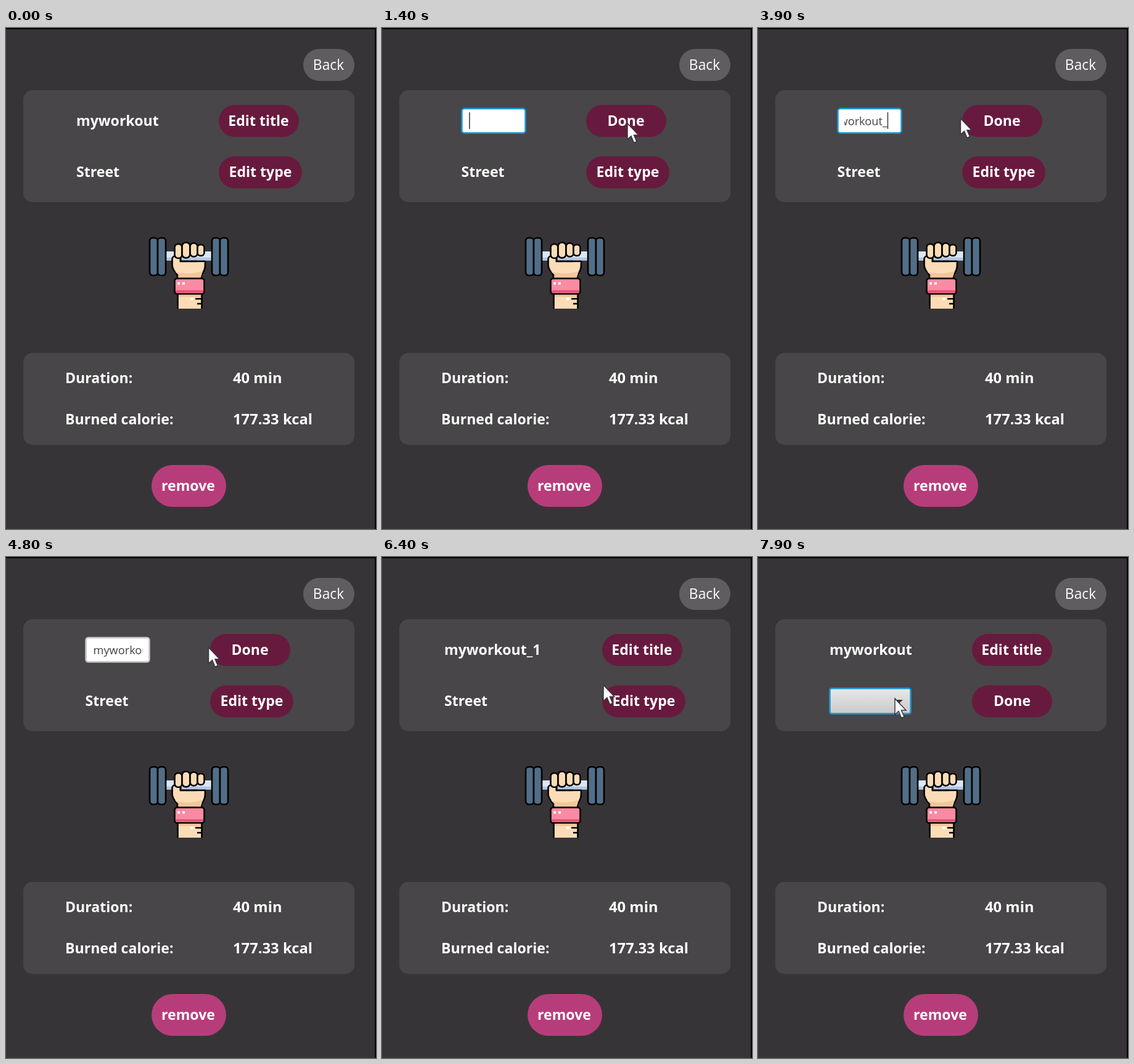
An HTML page that plays this animation: 600 by 814 pixels, repeating every 8000 ms.

```html
<!DOCTYPE html>
<html lang="en">
<head>
<meta charset="utf-8">
<title>Workout editor</title>
<style>
  html, body { margin: 0; width: 100%; height: 100%; overflow: hidden; background: #373437; }
  svg { display: block; width: 100vw; height: 100vh; }
  text { font: 700 23.1px "Open Sans", "Noto Sans", sans-serif; fill: #fff; white-space: pre; }
  .mid { text-anchor: middle; }
  .panel { fill: #484648; }
  .button { fill: #671a3e; }
  .plate { fill: #536e87; stroke: #000; stroke-width: 2.6; }
  .skin { fill: #fbdcb7; stroke: #000; stroke-width: 2.6; stroke-linejoin: round; }
  .line { fill: none; stroke: #000; stroke-width: 2.6; }
</style>
</head>
<body>
<svg viewBox="0 0 600 814">
  <defs>
    <linearGradient id="comboFill" x2="0" y2="1">
      <stop offset="0" stop-color="#e9e8e9"/><stop offset="1" stop-color="#cbcacb"/>
    </linearGradient>
    <clipPath id="fieldClip"><path d="M140 132H222V169H140Z"/></clipPath>
    <g id="plates">
      <rect class="plate" x="1.5" y="341" width="13" height="61" rx="5"/>
      <rect class="plate" x="14.5" y="341" width="13" height="61" rx="5"/>
    </g>
  </defs>

  <rect width="600" height="814" fill="#373437"/>
  <path d="M0 0H600V814H598V2H0Z"/>
  <rect x="482" y="34" width="83" height="52" rx="26" fill="#5f5d5f"/>
  <text class="mid" x="523" y="68" style="font-weight:400;font-size:22.8px">Back</text>
  <rect class="panel" x="28" y="101" width="537" height="182" rx="15"/>
  <rect class="panel" x="28" y="528" width="537" height="149.500" rx="15"/>
  <text x="96" y="577">Duration:</text>
  <text x="368" y="577" style="font-size:23.8px">40 min</text>
  <text x="96" y="644">Burned calorie:</text>
  <text x="368" y="644" style="font-size:23.8px">177.33 kcal</text>
  <rect x="236" y="710" width="121" height="68" rx="34" fill="#b73d7a"/>
  <text class="mid" x="295.500" y="752">remove</text>

  <!-- dumbbell -->
  <rect x="259" y="363" width="76" height="15" fill="#dce6f5"/>
  <path d="M259 373H335V378H259Z" fill="#b4c6e2"/>
  <use href="#plates" x="231.5"/>
  <use href="#plates" x="332.5"/>
  <path class="skin" d="M269.500 375Q270 370 276 371L283 373V379H323V384Q323 394 317 401V407H278V401Q270 393 269.500 385Z"/>
  <path d="M274 396Q296 402 319 395L316 405H280V401Z" fill="#f3c798"/>
  <path class="line" d="M283 372V379H310"/>
  <g class="skin">
    <rect x="273.500" y="351" width="12" height="23" rx="5.500"/>
    <rect x="285.500" y="348.500" width="13" height="25" rx="6"/>
    <rect x="298.500" y="349.500" width="12" height="22" rx="5.500"/>
    <rect x="310.500" y="352" width="11" height="18" rx="5"/>
  </g>
  <path d="M278.500 432H317.500V456H278.500Z" fill="#fbdcb7"/>
  <path d="M279 433H317V437H279Z" fill="#f3c798"/>
  <path class="line" d="M278.500 432V456M317.500 432V456M307 440H317M310 448H317"/>
  <rect x="273.500" y="407" width="48" height="25" rx="4" fill="#f98ba3" stroke="#000" stroke-width="2.600"/>
  <path d="M275 426H320V430.500H275Z" fill="#e5577a"/>
  <path d="M278 413h4v4h-4zM286 413h4v4h-4zM299 438h5v4h-5z" fill="#fff"/>

  <!-- editable rows -->
  <g id="labels">
    <text id="title" y="159"></text>
    <text id="type" y="242">Street</text>
  </g>
  <g id="buttons">
    <rect class="button" y="125" width="130" height="52" rx="26"/>
    <text id="titleAction" class="mid" x="64.500" y="159"></text>
    <rect id="typeButton" class="button" y="208.500" height="52" rx="26"/>
    <text id="typeAction" class="mid" y="242"></text>
  </g>
  <g id="field">
    <rect id="fieldBox" x="129.500" y="131" width="103" height="39.500" rx="4" fill="#fff" stroke-width="2.500"/>
    <g clip-path="url(#fieldClip)">
      <text id="typed" y="158" style="font-weight:400;font-size:18.2px;fill:#444"></text>
      <rect id="caret" y="137" width="1.800" height="27" fill="#555"/>
    </g>
  </g>
  <g id="combo">
    <rect x="116.500" y="213.500" width="131" height="41" rx="3" fill="url(#comboFill)" stroke="#1c9bd3" stroke-width="2.500"/>
    <path d="M222 232H235L228.500 238Z" fill="#333"/>
  </g>
  <path id="cursor" d="M0 0V26L6 20.500L10.500 31.500L15 29.500L10.500 19H18Z" fill="#fff" stroke="#39363c" stroke-width="1.500"/>
</svg>
<script>
const DURATION = 8000;
const NAME = "myworkout_1";
const el = id => document.getElementById(id);
const show = (id, visible) => el(id).setAttribute("visibility", visible ? "visible" : "hidden");
const move = (id, x, y = 0) => el(id).setAttribute("transform", `translate(${x} ${y})`);

const CLICK_TITLE = 1200, BLUR = 4600, SAVE = 5500, CLICK_TYPE = 7000;
const keyTimes = [2400, 2500, 2800, 2950, 3100, 3250, 3400, 3550, 3700, 3850, 4150];

// time, x, y of the pointer tip
const pointerPath = [
  [600, 440, 235], [900, 398, 155], [2300, 398, 155], [2450, 328.5, 147],
  [5850, 328.5, 147], [6150, 340, 270], [6400, 359, 208], [6650, 395, 228],
  [7200, 395, 228], [7700, 222, 230]
];

function pointerAt(t) {
  const next = pointerPath.findIndex(p => p[0] > t);
  if (next < 0) return pointerPath.at(-1).slice(1);
  const [t0, x0, y0] = pointerPath[Math.max(0, next - 1)], [t1, x1, y1] = pointerPath[next];
  const u = t1 === t0 ? 0 : (t - t0) / (t1 - t0);
  const ease = u * u * (3 - 2 * u);
  return [x0 + (x1 - x0) * ease, y0 + (y1 - y0) * ease];
}

function drawField(t) {
  const focused = t < BLUR;
  el("typed").textContent = NAME.slice(0, keyTimes.filter(k => k <= t).length);
  const width = el("typed").getComputedTextLength();
  const x = focused ? Math.min(141.5, 210 - width) : 141.5;
  el("typed").setAttribute("x", x);
  el("caret").setAttribute("x", Math.max(140.5, x + width - 0.5));
  el("fieldBox").setAttribute("stroke", focused ? "#1c9bd3" : "#c3c2c3");
  show("caret", focused && t >= CLICK_TITLE && !(t >= 1900 && t < keyTimes[0]));
}

function draw(t) {
  const editing = t >= CLICK_TITLE && t < SAVE;
  const choosing = t >= CLICK_TYPE;
  const renamed = t >= SAVE && !choosing;
  const [labelX, buttonX] = editing ? [128.5, 331] : renamed ? [101, 357] : choosing ? [116, 347] : [114, 345];
  move("labels", labelX);
  move("buttons", buttonX);
  el("title").textContent = editing ? "" : renamed ? NAME : "myworkout";
  el("titleAction").textContent = editing ? "Done" : "Edit title";
  el("typeAction").textContent = choosing ? "Done" : "Edit type";
  const typeWidth = choosing ? 130 : 135;
  el("typeButton").setAttribute("width", typeWidth);
  el("typeAction").setAttribute("x", typeWidth / 2);

  show("type", !choosing);
  show("combo", choosing);
  drawField(t);
  show("field", editing);
  show("cursor", t >= pointerPath[0][0]);
  move("cursor", ...pointerAt(t));
}

const start = performance.now();
function tick() {
  draw((performance.now() - start) % DURATION);
  requestAnimationFrame(tick);
}
tick();
</script>
</body>
</html>
```
